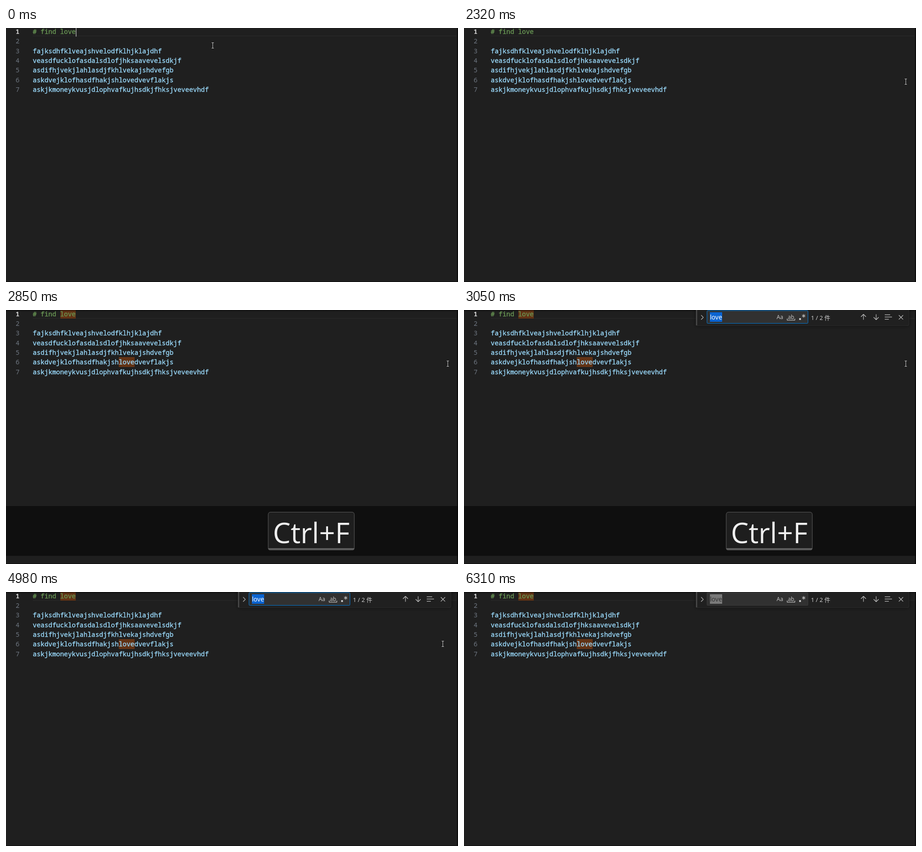
Write an HTML page with a canvas that moves like this. It is 998 by 561 pixels and loops after 6.38 s.

```html
<!DOCTYPE html>
<html lang="en">
<head>
<meta charset="utf-8">
<title>Find in editor</title>
<style>
html, body { margin: 0; width: 100%; height: 100%; overflow: hidden; background: #1f1f1f; }
canvas { display: block; }
</style>
</head>
<body>
<canvas id="stage" width="998" height="561"></canvas>
<script>
const ctx = document.getElementById('stage').getContext('2d');
const LOOP = 6380;
const W = 998, H = 561;
const LINE = 21.33, TEXT_X = 59, CHAR = 8.644;
const MONO = '14.407px "Noto Sans Mono", monospace';
const SANS = '"Noto Sans", "Open Sans", "Noto Sans CJK JP", "Noto Sans CJK", sans-serif';
const KEY_FONT = '62px "Open Sans", "Noto Sans", sans-serif';
const ICON = '#c5c5c5';
const LINES = [
  '# find love',
  '',
  'fajksdhfklveajshvelodfklhjklajdhf',
  'veasdfucklofasdalsdlofjhksaavevelsdkjf',
  'asdifhjvekjlahlasdjfkhlvekajshdvefgb',
  'askdvejklofhasdfhakjshlovedvevflakjs',
  'askjkmoneykvusjdlophvafkujhsdkjfhksjveveevhdf'
];

const within = (t, from, to) => t >= from && t < to;
const lerp = (a, b, p) => a + (b - a) * p;
const smooth = p => p * p * (3 - 2 * p);

// Number of discrete steps already taken: 0 before start, count from end on.
function stepsTaken(t, start, end, count) {
  const gap = (end - start) / (count - 1);
  return Math.max(0, Math.min(count, Math.floor((t - start + 8) / gap) + 1));
}

function rect(x, y, w, h, color) {
  ctx.fillStyle = color;
  ctx.fillRect(x, y, w, h);
}

function rounded(x, y, w, h, r, color) {
  ctx.fillStyle = color;
  ctx.beginPath();
  ctx.roundRect(x, y, w, h, r);
  ctx.fill();
}

function outline(x, y, w, h, r, color) {
  ctx.strokeStyle = color;
  ctx.lineWidth = 1;
  ctx.beginPath();
  ctx.roundRect(x + 0.5, y + 0.5, w - 1, h - 1, r);
  ctx.stroke();
}

function text(str, x, y, font, color, align = 'left') {
  ctx.font = font;
  ctx.fillStyle = color;
  ctx.textAlign = align;
  ctx.fillText(str, x, y);
}

function codeText(str, x, y, color) {
  text(str, x, y, MONO, color);
  ctx.strokeStyle = color;
  ctx.lineWidth = 0.35;
  ctx.strokeText(str, x, y);
}

function line(x1, y1, x2, y2, color = ICON, width = 1.2) {
  ctx.strokeStyle = color;
  ctx.lineWidth = width;
  ctx.beginPath();
  ctx.moveTo(x1, y1);
  ctx.lineTo(x2, y2);
  ctx.stroke();
}

function drawMatch(row, column) {
  const x = Math.round(TEXT_X + column * CHAR);
  const right = Math.round(TEXT_X + (column + 4) * CHAR);
  const y = Math.max(0, Math.round(row * LINE - 2.2));
  const bottom = Math.round((row + 1) * LINE - 2.2);
  rect(x, y, right - x, bottom - y, '#633315');
}

function drawEditor(t) {
  const searching = t >= 2850;
  const shift = searching ? 0.67 : 0;
  rect(0, 0, W, H, '#1f1f1f');
  rect(TEXT_X, searching ? 18 : 17, 936, 1, '#2a2a2a');

  LINES.forEach((code, row) => {
    const column = code.indexOf('love');
    if (searching && column >= 0) drawMatch(row, column);
    const y = Math.round(13 + row * LINE + shift);
    const current = row === 0;
    text(row + 1, 30, y, (current ? 'bold ' : '') + MONO, current ? '#cccccc' : '#6e7681', 'right');
    codeText(code, TEXT_X, y, current ? '#6a9955' : '#9cdcfe');
  });

  if (t < 335 || within(t, 860, 1330) || within(t, 1860, 2320)) {
    rect(154, 0, 1.5, 19, '#aeafad');
  }
  if (searching) {
    const shade = ctx.createLinearGradient(0, 0, 0, 4);
    shade.addColorStop(0, 'rgba(0,0,0,.5)');
    shade.addColorStop(1, 'rgba(0,0,0,0)');
    rect(0, 0, W, 4, shade);
  }
  rect(995, 0, 1, H, '#191919');
  rect(996, 0, 2, H, '#0c0c0c');
  rect(0, 560, W, 1, '#0c0c0c');
}

// Arrow head whose tip points along the given angle.
function drawHead(x, y, angle, size) {
  for (const side of [-1, 1]) {
    const a = angle + Math.PI + side * Math.PI / 4;
    line(x, y, x + size * Math.cos(a), y + size * Math.sin(a));
  }
}

// Strokes crossing at one centre: two make a cross, three an asterisk.
function drawSpokes(x, y, radius, count, turn) {
  for (let i = 0; i < count; i++) {
    const a = turn + i * Math.PI / count;
    const dx = radius * Math.cos(a), dy = radius * Math.sin(a);
    line(x - dx, y - dy, x + dx, y + dy);
  }
}

function drawFindIcons() {
  drawHead(528.5, 16.3, 0, 7);

  text('Aa', 697.5, 20, '12px ' + SANS, ICON, 'center');
  text('ab', 722, 19.5, '12px ' + SANS, ICON, 'center');
  line(713, 22.5, 731, 22.5);
  for (const x of [713.5, 730.5]) line(x, 19, x, 22);
  rect(740, 18, 4, 4, ICON);
  drawSpokes(750, 13, 4, 3, Math.PI / 6);

  for (const dir of [-1, 1]) {
    const x = 896 + 14 * dir, tip = 15.5 + 6 * dir;
    line(x, 15.5 - 6 * dir, x, tip);
    drawHead(x, tip, dir * Math.PI / 2, 7.8);
  }
  [12, 16, 9].forEach((length, i) => line(929, 10.5 + 5 * i, 929 + length, 10.5 + 5 * i));
  drawSpokes(964.8, 16.2, 6.7, 2, Math.PI / 4);
}

function drawFindWidget(open, focused) {
  if (!open) return;
  ctx.save();
  ctx.translate(0, -38 * (1 - open));
  ctx.shadowColor = 'rgba(0,0,0,.5)';
  ctx.shadowBlur = 8;
  rounded(512, -6, 471, 41, [0, 0, 4, 4], '#2b2b2b');
  ctx.shadowColor = 'transparent';
  rounded(513, -6, 469, 40, [0, 0, 4, 4], '#202020');
  rect(512, 0, 3, 34, '#454545');

  rounded(536, 1, 224, 29, 2, '#313131');
  outline(536, 1, 224, 29, 2, focused ? '#0078d4' : '#3a3a3a');
  rect(543, 5, 27, 21, focused ? '#0a64d2' : '#7a7a7a');
  text('love', 543, 21, '14px ' + SANS, focused ? '#ffffff' : '#353535');
  text('1 / 2 件', 766, 22, '13px ' + SANS, '#cccccc');
  drawFindIcons();
  ctx.restore();
}

function drawKeys(step) {
  const combo = step >= 4;
  const width = combo ? 191 : 116;
  const x = 674 - width / 2;
  ctx.save();
  ctx.globalAlpha = Math.min(1, step * 0.33);
  rect(0, 433, W, 110, 'rgba(0,0,0,.52)');
  rounded(x, 446, width, 84, 5, '#1e1e1e');
  outline(x, 446, width, 84, 5, '#5c5c5c');
  rounded(x, 526, width, 4.5, [0, 0, 5, 5], '#5c5c5c');
  text(combo ? 'Ctrl+F' : 'Ctrl', 674, 515, KEY_FONT, '#f0f0f0', 'center');
  ctx.restore();
}

function drawIBeam(x, y) {
  x = Math.round(x) + 0.5;
  y = Math.round(y) + 0.5;
  line(x, y - 6, x, y + 6, '#c8c8c8', 1);
  for (const end of [-6, 6]) line(x - 2.5, y + end, x + 2.5, y + end, '#c8c8c8', 1);
}

function drawArrow(x, y) {
  line(x + 2.5, y + 6, x + 5, y + 12, '#ffffff', 1.8);
  ctx.fillStyle = '#ffffff';
  ctx.beginPath();
  ctx.moveTo(x, y);
  ctx.lineTo(x, y + 11);
  ctx.lineTo(x + 8, y + 8);
  ctx.fill();
}

function drawPointer(t) {
  if (t < 4980) {
    const p = smooth(stepsTaken(t, 70, 340, 5) / 5);
    drawIBeam(lerp(456, 975, p), lerp(38, 118, p));
  } else if (t < 5172) {
    const p = (stepsTaken(t, 4980, 5180, 4) - 1) / 2;
    drawIBeam(lerp(964, 983, p * p), lerp(114, 172, p));
  } else if (within(t, 5440, 6110)) {
    // Swings left along a bow and slows down at the bottom edge.
    const p = (stepsTaken(t, 5440, 5910, 7) - 1) / 6;
    drawArrow(lerp(996, 984, p) - 44 * p * (1 - p), lerp(516, 555, p * (2 - p)));
  }
}

function draw(t) {
  const step = stepsTaken(t, 2590, 3050, 8);
  drawEditor(t);
  drawFindWidget(Math.max(0, step - 5) / 3, t < 6310);
  drawPointer(t);
  if (step && t < 3650) drawKeys(step);
}

const start = performance.now();
function tick() {
  draw((performance.now() - start) % LOOP);
  requestAnimationFrame(tick);
}
tick();
</script>
</body>
</html>
```
